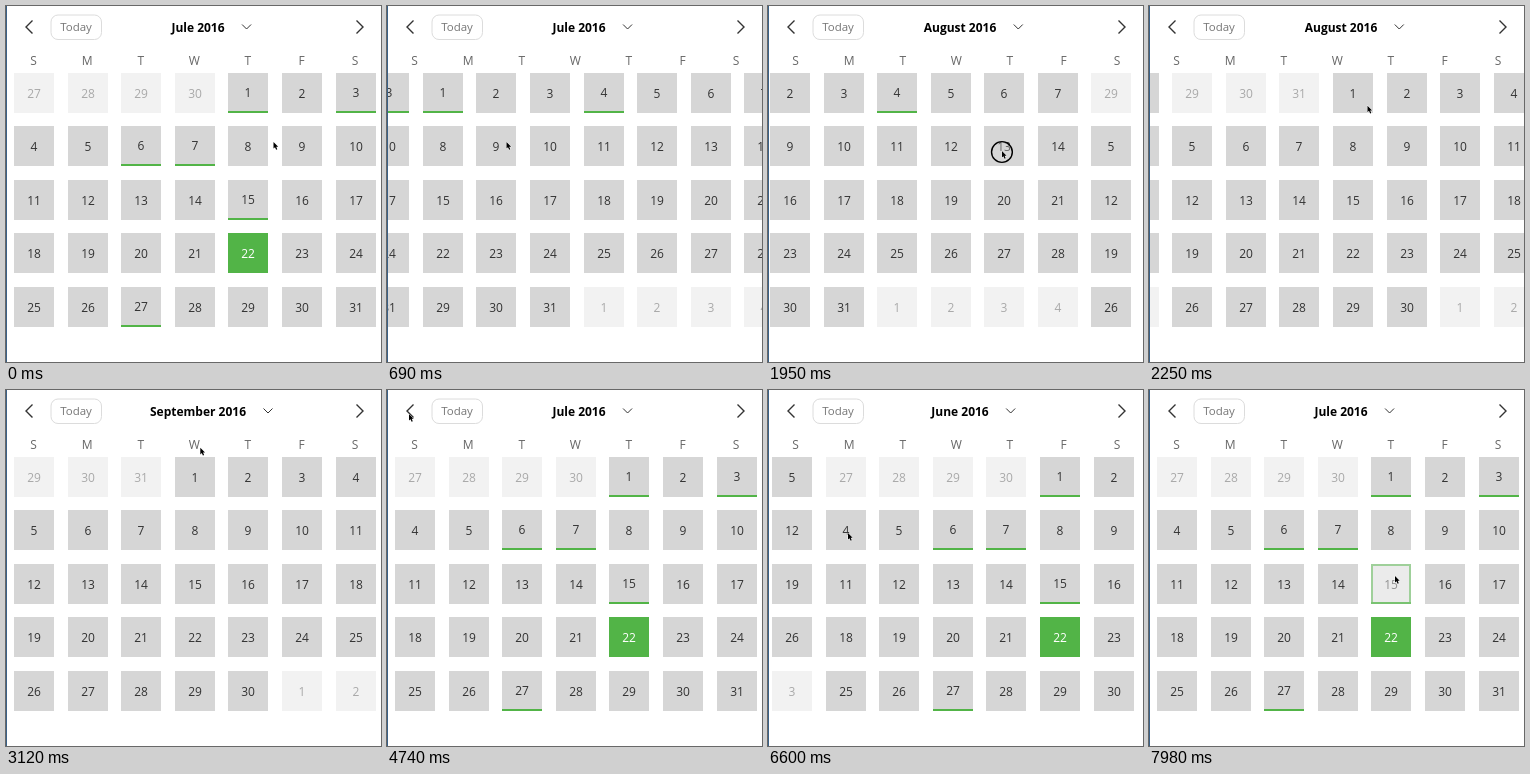
These frames come from a looping animation (375x356 px, 8000 ms). An HTML page with a canvas:

```html
<!DOCTYPE html>
<html lang="en">
<head>
<meta charset="utf-8">
<title>Swipe calendar</title>
<style>
  html, body { margin: 0; width: 100%; height: 100%; overflow: hidden; background: #fff; }
  canvas { display: block; width: 375px; height: 356px; }
</style>
</head>
<body>
<canvas id="stage"></canvas>
<script>
const W = 375, H = 356, LOOP = 8000;
const CELL = 40, PITCH = 53.6, LEFT = 8, TOP = 66.6;
const GREEN = '#52b447', FONT = '"Open Sans", "Noto Sans", sans-serif';

const canvas = document.getElementById('stage');
const ratio = window.devicePixelRatio || 1;
canvas.width = W * ratio;
canvas.height = H * ratio;
const ctx = canvas.getContext('2d');
ctx.scale(ratio, ratio);

// lead: cells taken by the previous month in the first row
const JUNE = { title: 'June 2016', lead: 2, before: 31, days: 30, events: [] };
const JULY = { title: 'Jule 2016', lead: 4, before: 30, days: 31, events: [1, 3, 6, 7, 15, 27], today: 22, picked: 15 };
const AUGUST = { title: 'August 2016', lead: 0, before: 31, days: 31, events: [1, 4] };
const SEPTEMBER = { title: 'September 2016', lead: 3, before: 31, days: 30, events: [] };

// Durations in ms; a swipe is a drag, a settling slide and a late title change.
const TRAVEL = 360, DRAG = 330, SETTLE = 465, TITLE_LAG = 1165;
const FADE = 270, TAP_LEAD = 270, TAP_HOLD = 90;
const REACH = 148, SLOP = 14.5;

const move = (at, x, y) => ({ kind: 'move', at, x, y });
const swipe = (at, month) => ({ kind: 'swipe', at, month });
const tap = (at, month) => ({ kind: 'tap', at, month });

const script = [
  swipe(167, AUGUST),
  move(810, 308, 145),
  swipe(1689, SEPTEMBER),
  move(2070, 276, 55),
  move(2820, 188, 58),
  move(3180, 66, 23),
  tap(3720, JULY),
  move(3750, 155, 107),
  move(4320, 22, 24),
  tap(5160, JUNE),
  move(5700, 228, 143),
  swipe(6119, JULY),
  move(6960, 246, 186),
];

const progress = (t, start, length) => Math.max(0, Math.min(1, (t - start) / length));
const mix = (a, b, u) => a + (b - a) * u;
const smooth = u => u * u * (3 - 2 * u);

function swipeOffset(t, at) {
  const dragged = Math.max(0, REACH * progress(t, at, DRAG) ** 3 - SLOP);
  const left = (1 - progress(t, at + DRAG, SETTLE)) ** 4;
  return mix(W, dragged, left);
}

// Plays the script up to time t.
function stateAt(t) {
  const state = { x: 267.5, y: 136, month: JULY, title: JULY.title, pressed: false };
  for (const { kind, at, x, y, month } of script) {
    if (kind === 'tap' && t >= at - TAP_LEAD && t < at - TAP_LEAD + TAP_HOLD) state.pressed = true;
    if (t < at) continue;
    if (kind === 'move') {
      const u = smooth(progress(t, at, TRAVEL));
      state.x = mix(state.x, x, u);
      state.y = mix(state.y, y, u);
      continue;
    }
    state.previous = state.month;
    state.month = month;
    state.offset = W;
    state.opacity = 1;
    if (kind === 'swipe') {
      state.x -= REACH * progress(t, at, DRAG) ** 3;
      state.pressed = t < at + DRAG;
      state.offset = swipeOffset(t, at);
      if (t >= at + TITLE_LAG) state.title = month.title;
    } else {
      state.opacity = progress(t, at, FADE);
      state.title = month.title;
    }
  }
  return state;
}

function withAlpha(alpha, draw) {
  ctx.save();
  ctx.globalAlpha *= alpha;
  draw();
  ctx.restore();
}

function text(str, x, y, color, size = 12, weight = 400) {
  ctx.font = `${weight} ${size}px ${FONT}`;
  ctx.textAlign = 'center';
  ctx.fillStyle = color;
  ctx.fillText(str, x, y);
  return ctx.measureText(str).width;
}

function chevron(x, y, angle, size, width) {
  ctx.save();
  ctx.translate(x, y);
  ctx.rotate(angle);
  ctx.beginPath();
  ctx.moveTo(-size, -size);
  ctx.lineTo(0, 0);
  ctx.lineTo(-size, size);
  ctx.strokeStyle = '#333';
  ctx.lineWidth = width;
  ctx.stroke();
  ctx.restore();
}

function drawCell(x, y, label, { outside, today, event, hover }) {
  ctx.fillStyle = today ? GREEN : outside ? '#f2f2f2' : '#d6d6d6';
  ctx.fillRect(x, y, CELL, CELL);
  if (event) {
    ctx.fillStyle = GREEN;
    ctx.fillRect(x, y + CELL - 2, CELL, 2);
  }
  withAlpha(hover, () => {
    ctx.strokeStyle = GREEN;
    ctx.lineWidth = 2;
    ctx.strokeRect(x + 1, y + 1, CELL - 2, CELL - 2);
  });
  const lift = event ? 1 - hover : 0;
  text(label, x + CELL / 2, y + 24.5 - lift, today ? '#fff' : outside ? '#a9a9a9' : '#333');
}

function drawMonth(month, shift, t) {
  for (let i = 0; i < 35; i++) {
    const x = Math.round(LEFT + (i % 7) * PITCH + shift);
    const y = Math.round(TOP + Math.floor(i / 7) * PITCH);
    const day = i - month.lead + 1;
    const outside = day < 1 || day > month.days;
    const label = day < 1 ? month.before + day : day > month.days ? day - month.days : day;
    const picked = day === month.picked;
    withAlpha(picked ? 1 - progress(t, 7890, 180) : 1, () => drawCell(x, y, label, {
      outside,
      today: day === month.today,
      event: month.events.includes(day),
      hover: picked ? progress(t, 7380, 300) : 0,
    }));
  }
}

function drawGrid({ previous, month, offset = W, opacity = 1 }, t) {
  if (offset < W) drawMonth(previous, -offset, t);
  if (opacity < 1) drawMonth(previous, 0, t);
  withAlpha(opacity, () => drawMonth(month, W - offset, t));
}

function drawHeader(title) {
  chevron(20, 21, Math.PI, 6.5, 1.4);
  chevron(357, 21, 0, 6.5, 1.4);
  ctx.beginPath();
  ctx.roundRect(45, 9, 50.5, 24.5, 7);
  ctx.strokeStyle = '#dcdcdc';
  ctx.lineWidth = 1;
  ctx.stroke();
  text('Today', 70, 25, '#777', 11.5);

  const width = text(title, 192, 25.5, '#000', 12, 700);
  chevron(192 + width / 2 + 22, 23, Math.PI / 2, 4.5, 1);
  [...'SMTWTFS'].forEach((day, i) => text(day, LEFT + CELL / 2 + i * PITCH - 0.5, 59, '#666'));
}

function drawPointer({ x, y, pressed }) {
  ctx.save();
  ctx.translate(x, y);
  if (pressed) {
    ctx.beginPath();
    ctx.arc(0, 1, 10.4, 0, 2 * Math.PI);
    ctx.fillStyle = 'rgba(214, 214, 214, .3)';
    ctx.fill();
    ctx.strokeStyle = '#000';
    ctx.lineWidth = 1.4;
    ctx.stroke();
  }
  const arrow = new Path2D('M0 0V6.6L1.5 5.2 2.6 7.8 3.8 7.3 2.7 4.8H4.7Z');
  ctx.strokeStyle = '#fff';
  ctx.lineWidth = 1;
  ctx.stroke(arrow);
  ctx.fillStyle = '#000';
  ctx.fill(arrow);
  ctx.restore();
}

function frame() {
  const t = performance.now() % LOOP;
  const state = stateAt(t);
  ctx.fillStyle = '#fff';
  ctx.fillRect(0, 0, W, H);
  drawHeader(state.title);
  drawGrid(state, t);
  ctx.fillStyle = '#3c6288';
  ctx.fillRect(0, 0, 1, H);
  drawPointer(state);
  requestAnimationFrame(frame);
}
frame();
</script>
</body>
</html>
```
